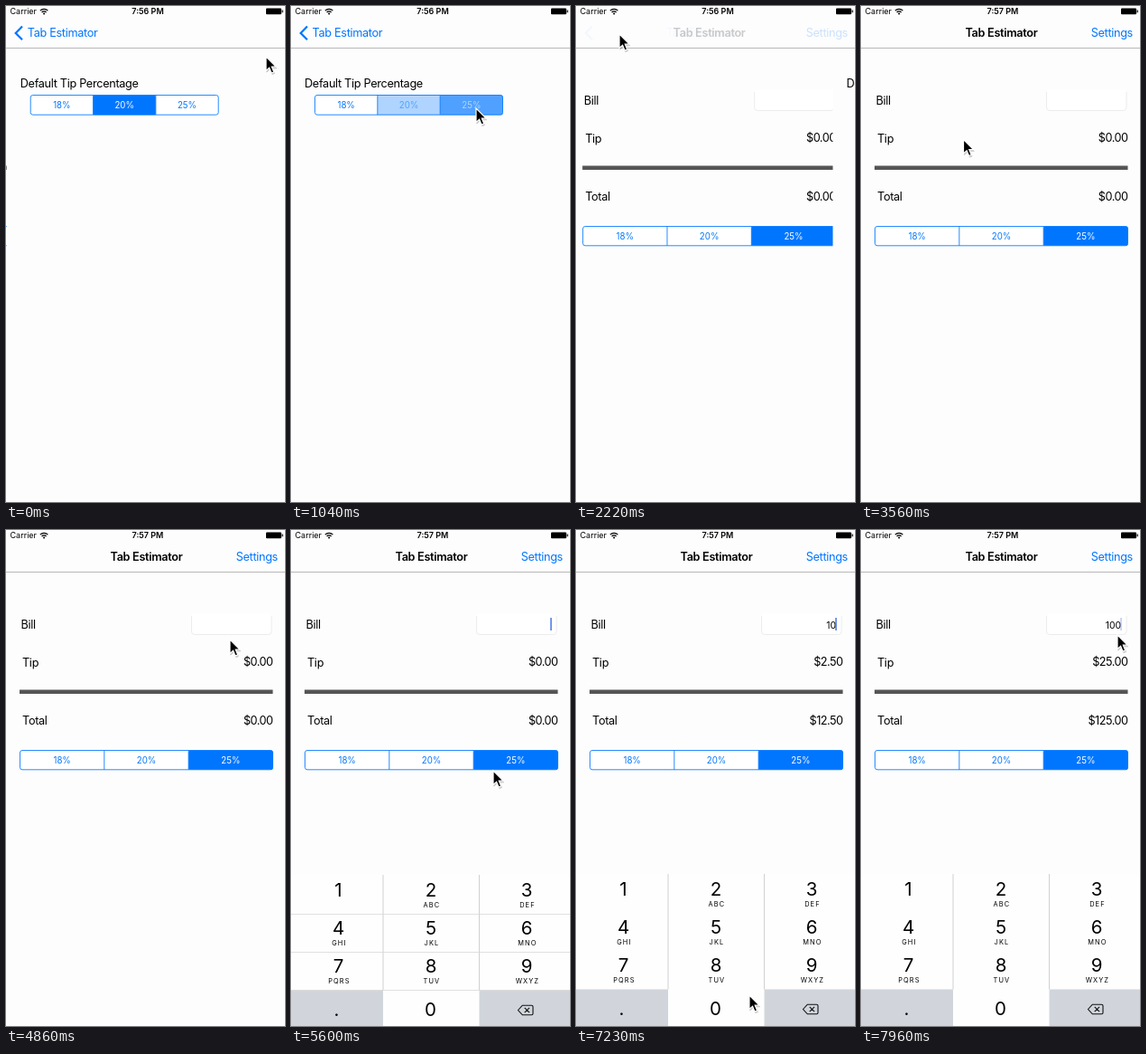
Recreate the animation shown at these times as an HTML page. Size 309 by 548 pixels, loop 8000 ms.

```html
<!DOCTYPE html>
<html lang="en">
<head>
<meta charset="utf-8">
<title>Tab Estimator</title>
<style>
  html, body { margin: 0; height: 100%; overflow: hidden; background: #fdfdfd; }
  svg { display: block; width: 100%; height: 100%; }
  text { font: 12.7px Inter, Roboto, sans-serif; letter-spacing: -.025em; white-space: pre; }
  .mid { text-anchor: middle; }
  .end { text-anchor: end; }
  .link { fill: #0076ff; }
  .bold { font-weight: 600; }
  .status { font-size: 9px; letter-spacing: 0; }
  .amount { letter-spacing: -.04em; }
  .option { font-size: 9.7px; letter-spacing: 0; }
  .bill { font-size: 10.4px; letter-spacing: 0; }
  .digit { font-size: 20.5px; letter-spacing: 0; }
  .letters { font-size: 7.4px; letter-spacing: 1.1px; }
</style>
</head>
<body>
<svg id="stage" viewBox="0 0 309 548"></svg>
<script>
// The picture advances in even steps; all moments below are counted in steps.
const LOOP = 8000, STEP = 147.5, LAST_STEP = 54;
const WIDTH = 309, APP = 'Tab Estimator', BLUE = '#0076ff', GREY = '#d1d5db';
const SELECT = 5.75, BACK = 13.3, CLOCK = 24, FOCUS = 33.6;
const BILL = '100', PRESSES = [41, 47, 50];
const stage = document.getElementById('stage');

const pointerStart = { x: 288, y: 56 };
const pointerMoves = [
  { from: 0, to: 4, x: 205, y: 113 },    // 25% option
  { from: 7, to: 11, x: 48, y: 31 },     // back button
  { from: 20, to: 28, x: 179, y: 264 },
  { from: 28, to: 33, x: 248, y: 121 },  // bill field
  { from: 36, to: 38, x: 224, y: 266 },
  { from: 38, to: 41, x: 80, y: 404 },   // key 1
  { from: 42, to: 46, x: 179, y: 536 },  // key 0
  { from: 46, to: 51, x: 199, y: 502 },
  { from: 52, to: 54, x: 284, y: 116 }
];

const text = (x, y, value, cls = '', attrs = '') =>
  `<text x="${x}" y="${y}" class="${cls}" ${attrs}>${value}</text>`;
const rect = (x, y, w, h, fill, attrs = '') =>
  `<rect x="${x}" y="${y}" width="${w}" height="${h}" fill="${fill}" ${attrs}/>`;
const path = (d, stroke, width) =>
  `<path d="${d}" fill="none" stroke="${stroke}" stroke-width="${width}"/>`;
const group = (x, y, content, attrs = '') =>
  `<g transform="translate(${x} ${y})" ${attrs}>${content}</g>`;
const whiteOverBlue = a => `rgb(${255 * a},${118 + 137 * a},255)`;
const clamp = v => Math.max(0, Math.min(1, v));
const smooth = k => k * k * (3 - 2 * k);

// levels: how strongly each of the three options is filled, 0 to 1
function segments(x, y, w, h, levels) {
  const part = w / 3;
  const cells = levels.map((level, i) =>
    rect(x + i * part, y, part, h, whiteOverBlue(1 - level), 'rx="1.5"') +
    text(x + (i + .5) * part, y + h / 2 + 3.5, ['18%', '20%', '25%'][i], 'option mid',
      `fill="${whiteOverBlue(level)}"`));
  return cells.join('') +
    rect(x, y, w, h, 'none', `rx="2.5" stroke="${BLUE}" stroke-width=".85"`) +
    path(`M${x + part} ${y}v${h}M${x + 2 * part} ${y}v${h}`, BLUE, .85);
}

function statusBar(n) {
  return text(4.5, 9, 'Carrier', 'status') +
    path('M37.8 5.2a6 6 0 0 1 8.6 0M39.6 7a3.5 3.5 0 0 1 5 0', '#000', 1.2) +
    '<circle cx="42.1" cy="8.5" r="1"/>' +
    text(157, 9, n < CLOCK ? '7:56 PM' : '7:57 PM', 'status bold mid') +
    rect(288, 2.5, 17, 6.8, '#000', 'rx="1"') + rect(305.6, 4.5, 1.2, 2.8, '#000');
}

function navBar(n, slide) {
  const backLink = path('M18 22.5L10.7 30L18 37.3', BLUE, 2.2) +
    text(23.5 + 83 * slide, 34, APP, 'link');
  const homeTitle = text(155.5 - 100 * (1 - slide), 34, APP, 'bold mid') +
    text(301, 34, 'Settings', 'link end');
  return rect(0, 0, WIDTH, 46, '#fdfdfd') + path('M0 46.5H309', '#b8b8b8', 1) +
    group(0, 0, backLink, `opacity="${clamp((15.1 - n) / 3)}"`) +
    group(0, 0, homeTitle, `opacity="${clamp((n - 14.5) / 2.5)}"`);
}

function homePage(n) {
  const bill = BILL.slice(0, PRESSES.filter(p => n > p).length);
  const money = v => '$' + v.toFixed(2);
  const caret = rect(287.3, 97, 1.4, 14, '#4169e1', `opacity="${clamp(LAST_STEP + .4 - n)}"`);
  return text(16.5, 109, 'Bill') +
    rect(205.5, 92.5, 88.5, 23, '#fff', 'rx="3.5"') +
    path('M205.5 95V112q0 3.5 3.5 3.5H290.5q3.5 0 3.5-3.5V95', '#e8e8e8', .8) +
    text(288, 108.5, bill, 'bill end') + (n > FOCUS ? caret : '') +
    text(18, 151, 'Tip') + text(295.5, 150.3, money(bill * .25), 'amount end') +
    rect(15, 176.5, 280.5, 4.5, '#555') +
    text(18, 215.3, 'Total') + text(295.5, 214.8, money(bill * 1.25), 'amount end') +
    segments(15.5, 243.5, 280, 21.3, [0, 0, 1]);
}

function settingsPage(n) {
  const fade = clamp((n - SELECT) * .55);
  return rect(0, 47, WIDTH, 501, '#fdfdfd') +
    text(15, 89.5, 'Default Tip Percentage') +
    segments(26.5, 98.5, 208, 21.7, [0, 1 - fade, fade]);
}

function keypad(n) {
  if (n < FOCUS) return '';
  const offset = Math.round(168 * Math.exp(-1.17 * (n - FOCUS)));
  const centers = [52.5, 155, 261];
  const letters = ['', 'ABC', 'DEF', 'GHI', 'JKL', 'MNO', 'PQRS', 'TUV', 'WXYZ'];
  const pressed = PRESSES.includes(n) ? BILL[PRESSES.indexOf(n)] : '';
  const keys = letters.map((label, i) => {
    const x = centers[i % 3], y = 404 + 42.2 * Math.floor(i / 3);
    return text(x, y, i + 1, 'digit mid') + text(x + .9, y + 11.8, label, 'letters mid');
  });
  return group(0, offset,
    rect(0, 380, WIDTH, 168, '#fefefe') +
    rect(0, 507.5, 102, 41, GREY) + rect(208.5, 507.5, 101, 41, GREY) +
    (pressed === '1' ? rect(0, 380, 102, 43, GREY) : '') +
    (pressed === '0' ? rect(102, 507.5, 106.5, 41, GREY) : '') +
    path('M102 380V507.5M208.5 380V507.5', '#d0d0d0', 1) +
    (offset ? path('M0 423.5H309M0 465.5H309M0 507.5H309', '#d8d8d8', .8) : '') +
    keys.join('') +
    text(50.5, 535.5, '.', 'digit mid') + text(154.5, 536, '0', 'digit mid') +
    path('M251.5 529.5L256.3 524.2H266.5Q268 524.2 268 525.7V533.3Q268 534.8 266.5 534.8H256.3Z' +
      'M258.7 526.8l5.4 5.4M264.1 526.8l-5.4 5.4', '#111', 1.1));
}

function pointer(n) {
  let { x, y } = pointerStart;
  for (const move of pointerMoves) {
    const k = smooth(clamp((n - move.from) / (move.to - move.from)));
    x += (move.x - x) * k;
    y += (move.y - y) * k;
  }
  const arrow = 'M0 0V15.5L3.6 12.2L6 18L8.7 17L6.3 11.2H11Z';
  return group(x, y, `<path d="${arrow}" transform="translate(.8 1.6)" stroke="#000" opacity=".2"/>` +
    `<path d="${arrow}" stroke="#fff" stroke-width="1.2"/>`);
}

function draw(n) {
  // Tail of the push into settings, then the slide back home.
  const slide = n < BACK ? .0023 * Math.exp(-1.5 * n) : 1 - Math.exp(-1.49 * (n - BACK));
  stage.innerHTML =
    group(-.32 * WIDTH * (1 - slide), 0, homePage(n)) +
    group(WIDTH * slide, 0, settingsPage(n)) +
    navBar(n, slide) + statusBar(n) + keypad(n) + pointer(n);
}

let shown = -1;
function tick() {
  const time = performance.now() % LOOP;
  const n = Math.min(LAST_STEP, Math.floor((time + 8) / STEP));
  if (n !== shown) draw(shown = n);
  requestAnimationFrame(tick);
}
tick();
</script>
</body>
</html>
```
